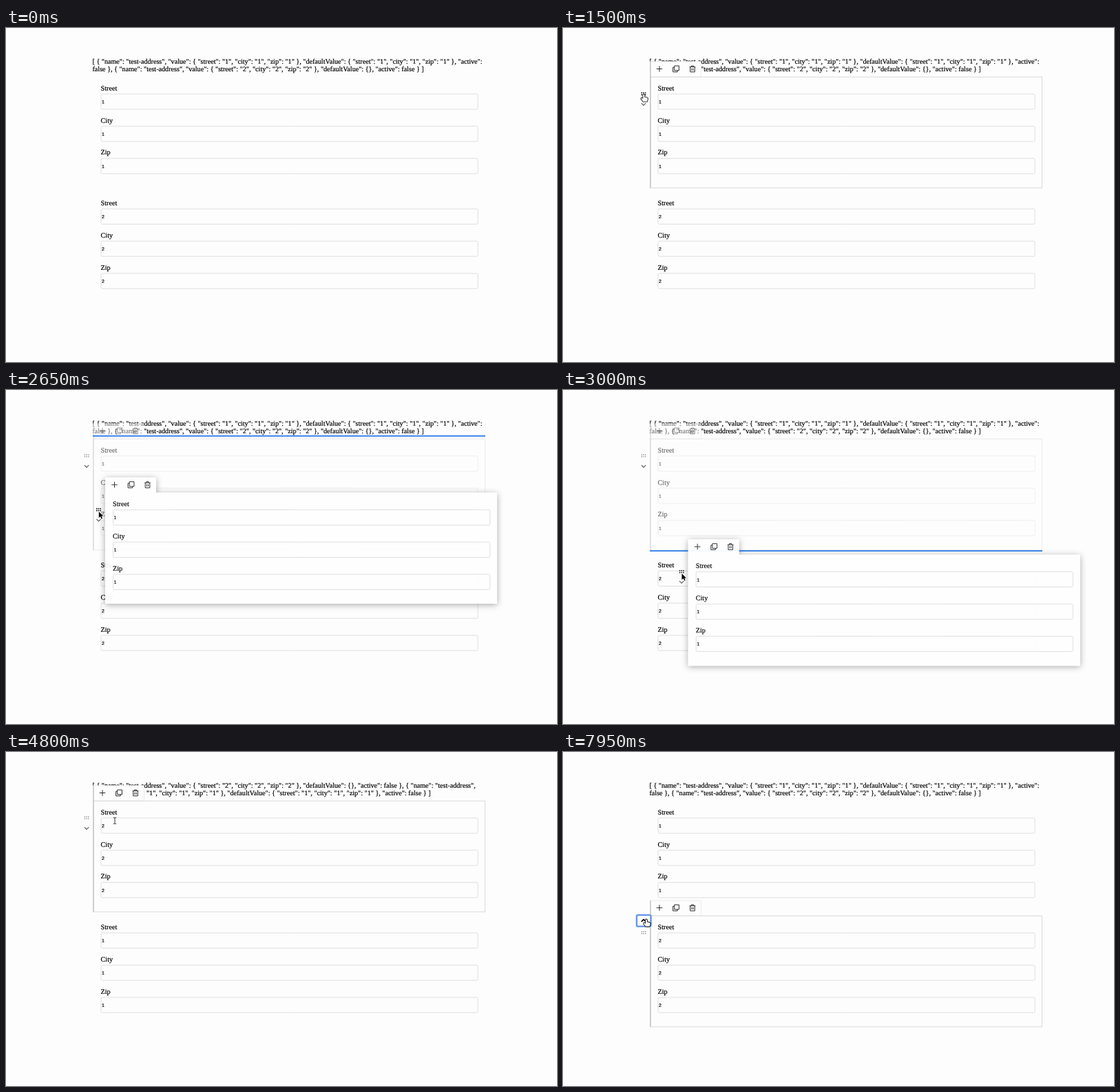
An HTML page with a canvas for the animation above (8000 ms loop, 800x486 px).

```html
<!DOCTYPE html>
<html lang="en">
<head>
<meta charset="utf-8">
<title>Sortable address blocks</title>
<style>
html, body { margin: 0; width: 100%; height: 100%; overflow: hidden; background: #fdfdfd; }
canvas { display: block; width: 800px; height: 486px; }
</style>
</head>
<body>
<canvas id="stage"></canvas>
<script>
const W = 800, H = 486, LOOP = 8000, STEP = 50;
const canvas = document.getElementById('stage');
const ctx = canvas.getContext('2d');
const dpr = window.devicePixelRatio || 1;
canvas.width = W * dpr;
canvas.height = H * dpr;

const SERIF = '10.15px "Liberation Serif", "Times New Roman", serif';
const SANS = '7px "Liberation Sans", Arial, sans-serif';
const PAPER = '#fdfdfd', BLUE = '#3b88ee';
const LEFT = 126.5, WIDTH = 569, BLOCK_H = 161.5, BAR_W = 74, BAR_H = 22.2;
const TOPS = [71.2, 238.4];
const ENTER = 100, DRAG = 2150, DROP = 3600, CLICK = 7500;

// Pointer moves: start and end time, then the place reached
const ENTRY = { x: 66, y: 467 };
const GRAB = { x: 117.3, y: 98.5 };
const MOVES = [
  { from: 100, to: 600, x: 222, y: 240 },
  { from: 600, to: 900, x: 193, y: 124 },
  { from: 900, to: 950, x: 165.5, y: 113.5 },
  { from: 1100, to: 1500, ...GRAB },
  { from: 2150, to: 2650, x: 134.8, y: 176.9 },
  { from: 2650, to: 3000, x: 172.5, y: 267 },
  { from: 3000, to: 3200, x: 172.3, y: 303.5 },
  { from: 4050, to: 4800, x: 158, y: 100 },
  { from: 4800, to: 5050, x: 127, y: 98.5 },
  { from: 5800, to: 6250, x: 112, y: 185 },
  { from: 6250, to: 6600, x: 130.5, y: 277 },
  { from: 6650, to: 7150, x: 121, y: 245.4 }
];

const ARROW = new Path2D('M0 0V9.2L2.2 7.2L3.7 10.6L5.2 10L3.7 6.7H6.6Z');
const HAND = new Path2D('M-1 -1Q0 -3 1 -1V2L4.5 2.8Q6 3.2 5.6 5L4.6 8.4H-.8L-3.8 4.6Q-4 3 -2.4 3.4L-1 4.6Z');
const BEAM = new Path2D('M-2.1 -4.7Q0 -4.7 0 -3.5Q0 -4.7 2.1 -4.7M0 -3.5V3.5M-2.1 4.7Q0 4.7 0 3.5Q0 4.7 2.1 4.7');
const COPY = new Path2D('M-2.3 -4.4H4.4V2.3H-2.3ZM-2.3 -2.2H-4.4V4.4H2.2V2.3');
const TRASH = new Path2D('M-4.3 -2.9H4.3M-1.6 -2.9V-4.4H1.6V-2.9M-3.3 -2.9V4.4H3.3V-2.9M-1.1 -.8V2.4M1.1 -.8V2.4');
const PLUS = new Path2D('M-4.3 0H4.3M0 -4.3V4.3');
const CHEVRON = new Path2D('M-3.2 1.7L0 -1.5L3.2 1.7');

function pointerAt(t) {
  let { x, y } = ENTRY;
  for (const m of MOVES) {
    const k = Math.min(1, Math.max(0, (t - m.from) / (m.to - m.from)));
    x += (m.x - x) * k;
    y += (m.y - y) * k;
  }
  return { x, y };
}

// A hairline stroke gives the text its slightly heavy weight.
function write(text, x, y, font) {
  ctx.font = font;
  ctx.fillStyle = ctx.strokeStyle = '#000';
  ctx.lineWidth = 0.2;
  ctx.fillText(text, x, y);
  ctx.strokeText(text, x, y);
}

function line(path, x, y, color, width, flip) {
  ctx.save();
  ctx.translate(x, y);
  if (flip) ctx.scale(1, -1);
  ctx.lineJoin = 'round';
  ctx.strokeStyle = color;
  ctx.lineWidth = width;
  ctx.stroke(path);
  ctx.restore();
}

const address = n => `{ "street": "${n}", "city": "${n}", "zip": "${n}" }`;

function drawJson(swapped) {
  const name = '"name": "test-address",';
  const lines = swapped
    ? [`[ { ${name} "value": ${address(2)}, "defaultValue": {}, "active": false }, { ${name}`,
       `"value": ${address(1)}, "defaultValue": ${address(1)}, "active": false } ]`]
    : [`[ { ${name} "value": ${address(1)}, "defaultValue": ${address(1)}, "active":`,
       `false }, { ${name} "value": ${address(2)}, "defaultValue": {}, "active": false } ]`];
  lines.forEach((s, i) => write(s, 125.5, 52 + i * 11.4, SERIF));
}

function drawFields(top, value) {
  ['Street', 'City', 'Zip'].forEach((label, i) => {
    const y = top + i * 46.9;
    write(label, 137.6, y + 19.4, SERIF);
    ctx.beginPath();
    ctx.roundRect(138, y + 24.8, 547.2, 22.2, 2);
    ctx.strokeStyle = '#dedfe3';
    ctx.lineWidth = 1;
    ctx.stroke();
    write(value, 139, y + 38.8, SANS);
  });
}

function drawIcons(top) {
  [PLUS, COPY, TRASH].forEach((icon, i) => line(icon, 140 + i * 24, top - 11.7, '#222', 0.95));
}

function buttonsOf(index) {
  const top = TOPS[index];
  return { grip: top + 24.5, arrow: top + (index ? 6.8 : 39.9) };
}

function drawHandles(index, active) {
  const { grip, arrow } = buttonsOf(index);
  const bold = active === 'grip', hot = active === 'arrow';
  ctx.fillStyle = bold ? '#000' : '#777';
  for (let i = 0; i < 6; i++) {
    ctx.beginPath();
    ctx.arc(114.3 + (i % 3) * 2.7, grip - 1.4 + Math.floor(i / 3) * 2.8, bold ? 0.9 : 0.75, 0, 7);
    ctx.fill();
  }
  line(CHEVRON, 117, arrow, hot ? '#000' : '#555', hot ? 1.7 : 1.1, !index);
}

function drawFrame(top) {
  ctx.fillStyle = PAPER;
  ctx.fillRect(LEFT, top - BAR_H, BAR_W, BAR_H);
  ctx.lineWidth = 1;
  ctx.strokeStyle = '#ececee';
  ctx.strokeRect(LEFT, top - BAR_H, BAR_W, BAR_H);
  ctx.strokeStyle = '#d9d9dc';
  ctx.strokeRect(LEFT, top, WIDTH, BLOCK_H);
  ctx.fillStyle = '#c6c8cc';
  ctx.fillRect(LEFT - 0.3, top - BAR_H, 1.6, BLOCK_H + BAR_H);
  drawIcons(top);
}

function drawGhost(p) {
  const top = TOPS[0];
  const shape = new Path2D();
  shape.rect(LEFT, top, WIDTH, BLOCK_H);
  shape.rect(LEFT, top - BAR_H, BAR_W, BAR_H);
  const outside = new Path2D(shape);
  outside.rect(-W, -H, 3 * W, 3 * H);

  ctx.save();
  ctx.translate(p.x - GRAB.x, p.y - GRAB.y);
  ctx.save();
  ctx.clip(outside, 'evenodd');
  ctx.shadowColor = 'rgba(0,0,0,0.34)';
  ctx.shadowBlur = 10 * dpr;
  ctx.shadowOffsetY = 1.5 * dpr;
  ctx.fillStyle = '#fff';
  ctx.fill(shape);
  ctx.restore();

  ctx.globalAlpha = 0.95;
  ctx.fillStyle = '#fefefe';
  ctx.fill(shape);
  drawIcons(top);
  drawFields(top, '1');
  drawHandles(0, 'grip');
  ctx.restore();
}

function drawDropLine(p) {
  const target = p.y > TOPS[1] ? 1 : 0;
  ctx.fillStyle = BLUE;
  ctx.fillRect(126, TOPS[target] - 5.3, 570, 2);
}

function drawPointer(p, kind) {
  if (kind === 'beam') {
    line(BEAM, p.x, p.y, '#222', 0.9);
    return;
  }
  const hand = kind === 'hand', path = hand ? HAND : ARROW;
  line(path, p.x, p.y, hand ? '#111' : '#fff', hand ? 1.8 : 1.2);
  ctx.save();
  ctx.translate(p.x, p.y);
  ctx.fillStyle = hand ? '#fff' : '#000';
  ctx.fill(path);
  ctx.restore();
}

function drawFocusRing() {
  ctx.beginPath();
  ctx.roundRect(107, 237.2, 20.6, 16.6, 1.5);
  ctx.strokeStyle = '#bcd3f7';
  ctx.lineWidth = 3;
  ctx.stroke();
  ctx.strokeStyle = '#4f88e2';
  ctx.lineWidth = 1.6;
  ctx.stroke();
}

function hoverAt(p) {
  if (p.x < 106 || p.x > 696) return -1;
  return TOPS.findIndex(top => p.y > top && p.y < top + BLOCK_H);
}

function buttonAt(p, index) {
  if (index < 0 || p.x > 126) return '';
  const b = buttonsOf(index);
  return Object.keys(b).find(k => Math.abs(p.y - b[k]) < 7.5) || '';
}

function overInput(p) {
  if (p.x < 138 || p.x > 685) return false;
  return TOPS.some(top => {
    const y = p.y - top - 24.8;
    return y > 0 && y < 3 * 46.9 && y % 46.9 < 22.2;
  });
}

function draw(t) {
  const swapped = t >= DROP && t < CLICK;
  const dragging = t >= DRAG && t < DROP;
  const p = pointerAt(t);
  const hover = t < ENTER || t === DROP ? -1 : dragging ? 0 : hoverAt(p);
  const button = dragging ? '' : buttonAt(p, hover);

  ctx.setTransform(dpr, 0, 0, dpr, 0, 0);
  ctx.textRendering = 'geometricPrecision';
  ctx.fillStyle = PAPER;
  ctx.fillRect(0, 0, W, H);
  drawJson(swapped);

  TOPS.forEach((top, i) => {
    ctx.globalAlpha = dragging && i === 0 ? 0.5 : 1;
    if (hover === i) drawFrame(top);
    drawFields(top, swapped === (i === 0) ? '2' : '1');
    ctx.globalAlpha = 1;
    if (hover === i) drawHandles(i, button);
  });

  if (dragging) {
    drawDropLine(p);
    drawGhost(p);
  }
  if (t >= CLICK) drawFocusRing();
  if (t >= ENTER) {
    const kind = dragging ? 'arrow' : button ? 'hand' : overInput(p) ? 'beam' : 'arrow';
    drawPointer(p, kind);
  }
}

const start = performance.now();
function tick(now) {
  const t = Math.max(0, now - start) % LOOP;
  draw(Math.floor(t / STEP) * STEP);
  requestAnimationFrame(tick);
}
draw(0);
requestAnimationFrame(tick);
</script>
</body>
</html>
```
